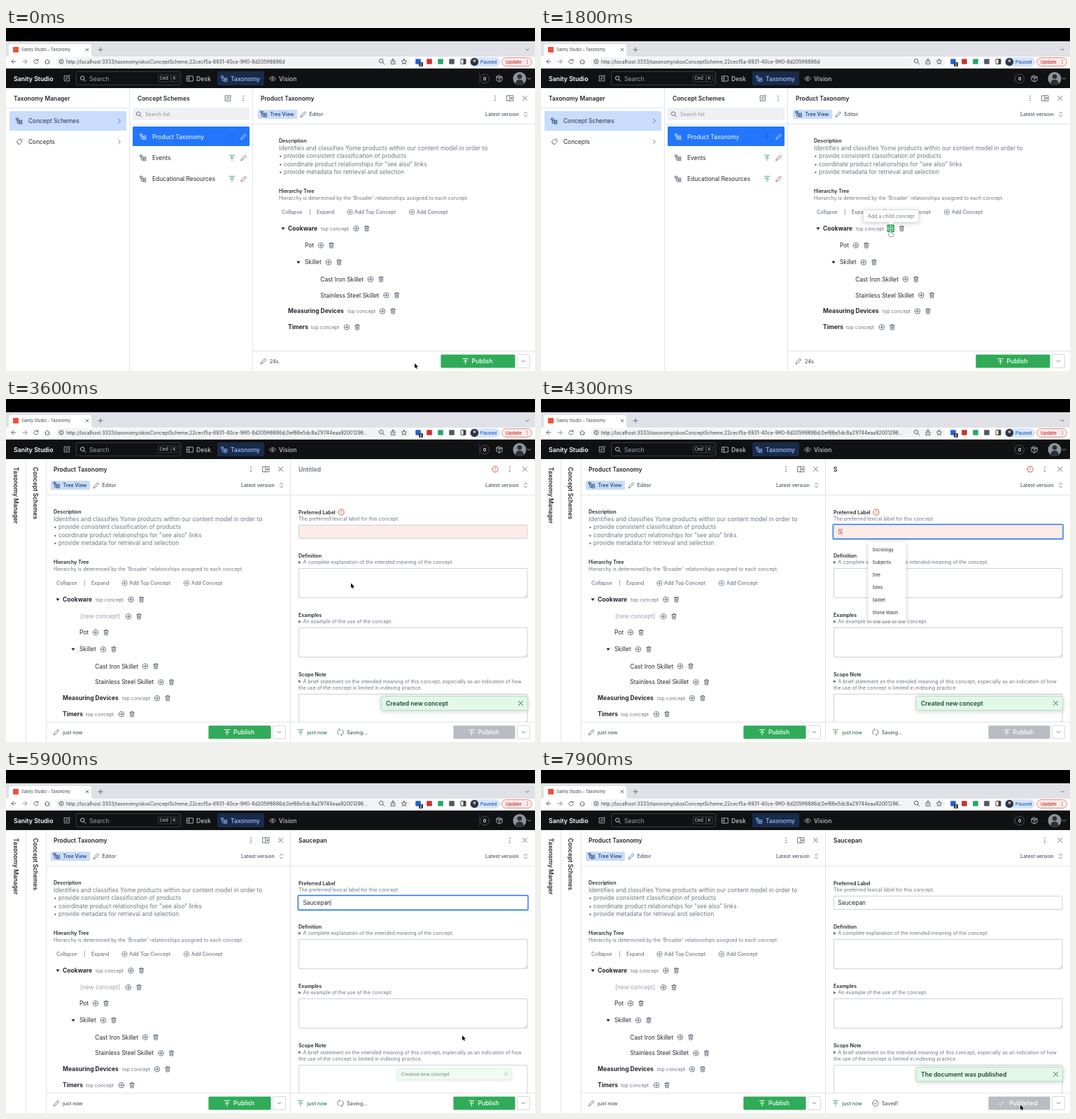
Recreate the animation shown at these times as an HTML page. Size 756 by 491 pixels, loop 8000 ms.

```html
<!DOCTYPE html>
<html lang="en">
<head>
<meta charset="utf-8">
<title>Taxonomy studio</title>
<style>
html, body { margin: 0; width: 756px; height: 491px; overflow: hidden; background: #fff; }
svg { display: block; font-family: Inter, "Liberation Sans", sans-serif; }
text { white-space: pre; }
</style>
</head>
<body>
<svg id="stage" width="756" height="491" viewBox="0 0 756 491"></svg>
<script>
const LOOP = 8000, STEP = 100;
const INK = '#22262d', GREY = '#6e7683', DARK = '#4b5563', LINE = '#e1e4e9';
const GREEN = '#30ab59', BLUE = '#2276fc', PALE = '#c8dcfc', RED = '#bf382d';
const MONO = 'font-family="Noto Sans Mono, monospace"';

// Icon outlines, each centred on 0,0
const ICONS = {
  plus: 'M-3.7 0a3.7 3.7 0 1 0 7.4 0a3.7 3.7 0 1 0-7.4 0M-2 0h4M0-2v4',
  trash: 'M-3.2-2.6h6.4M-1.2-2.6v-1.1h2.4v1.1M-2.5-2.6l.4 6.2h4.2l.4-6.2M-.8-.9v2.8M.8-.9v2.8',
  upload: 'M-3.7-3.6h7.4M0 4v-5.6M-2.7.8L0-1.9 2.7.8',
  pencil: 'M-3.7 3.7l.7-2.4 5-5 1.7 1.7-5 5z',
  tree: 'M-4.3-3.8h3v2h-3zM-2.8-1.8v4.9h3M-2.8 0h3M.3-1h3.6v2H.3zM.3 2.1h3.6v2H.3z',
  close: 'M-3-3l6 6M3-3l-6 6',
  tabClose: 'M-2-2l4 4M2-2l-4 4',
  dots: 'M0-3.1v.1M0 0v.1M0 3.1v.1',
  smallDots: 'M0-2.3v.1M0 0v.1M0 2.3v.1',
  split: 'M-4.5-3.7h9v7.4h-9zM-.7-3.7v7.4M.7 0h2.6M2-1.3v2.6',
  right: 'M-1.4-2.8l2.8 2.8-2.8 2.8',
  down: 'M-2.2-1.1L0 1.1l2.2-2.2',
  sort: 'M-2-1.3l2-2 2 2M-2 1.3l2 2 2-2',
  grip: 'M-1.5 1.5l3-3M0 1.5l1.5-1.5',
  compose: 'M1-3.6h-4.8v7.4h7.4V-.8M-1.2 1.2l.3-1.7 4.2-4.2 1.4 1.4-4.2 4.2z',
  search: 'M-3.6-.8a2.8 2.8 0 1 0 5.6 0a2.8 2.8 0 1 0-5.6 0M1.2 1.2l2.6 2.6',
  tag: 'M-3.4-.6l3.6-3.2 3.4.3.2 3.4L.2 3.6zM-3.4.8l3.2 3.2M1.7-1.7v.1',
  desk: 'M-4.3-3.6h8.6v7.2h-8.6zM-1.4-3.6v7.2M-4.3 0h2.9',
  eye: 'M-4.6 0q4.6-6.2 9.2 0q-4.6 6.2-9.2 0M-1.3 0a1.3 1.3 0 1 0 2.6 0a1.3 1.3 0 1 0-2.6 0',
  cube: 'M0-4.5l4 2v5l-4 2-4-2v-5zM-4-2.5l4 2 4-2M0-.5v5M-2-3.5l4 2',
  back: 'M3 0h-6M0-3l-3 3 3 3',
  forward: 'M-3 0h6M0-3l3 3-3 3',
  reload: 'M2.4-1.7a3 3 0 1 0 .5 2.4M2.9-3.4v2h-2',
  home: 'M-3.5.2L0-3l3.5 3.2M-2.4-.4v3.5h4.8v-3.5',
  info: 'M-3 0a3 3 0 1 0 6 0a3 3 0 1 0-6 0M0-.3v1.8M0-1.6v.1',
  share: 'M-1.5-1h-1.3v4.6h5.6V-1H1.5M0 1.2v-5M-1.5-2.4L0-3.9l1.5 1.5',
  star: 'M0-3.6l1.1 2.4 2.6.3-1.9 1.8.5 2.6L0 2.2l-2.3 1.3.5-2.6-1.9-1.8 2.6-.3z',
  add: 'M-3 0h6M0-3v6',
  alert: 'M-4.1 0a4.1 4.1 0 1 0 8.2 0a4.1 4.1 0 1 0-8.2 0M0-2v2.2M0 1.8v.1',
  sync: 'M-2.2 3.6a4.2 4.2 0 0 1 .4-7.4M-1-5l-.6 1.4 1.4.7M2.2-3.6a4.2 4.2 0 0 1-.4 7.4M1 5l.6-1.4-1.4-.7',
  saved: 'M-4.2 0a4.2 4.2 0 1 0 8.4 0a4.2 4.2 0 1 0-8.4 0M-1.8.1l1.3 1.4L2-1.4',
  check: 'M-3.4.4l2.2 2.3L3.6-2.7'
};

const text = (x, y, s, size = 8.4, fill = INK, weight = 400, extra = '') =>
  `<text x="${x}" y="${y + size * .36}" font-size="${size}" fill="${fill}" font-weight="${weight}" ${extra}>${s}</text>`;
const small = (x, y, s, fill = GREY, weight = 400) => text(x, y, s, 7.1, fill, weight);
const title = (x, s, fill = INK) => text(x, 100.5, s, 8.45, fill, 600);
const rect = (x, y, w, h, fill, r = 0, stroke = 'none', sw = 1) =>
  `<rect x="${x}" y="${y}" width="${w}" height="${h}" fill="${fill}" rx="${r}" stroke="${stroke}" stroke-width="${sw}"/>`;
const icon = (name, x, y, color = DARK, sw = .8) =>
  `<path d="${ICONS[name]}" transform="translate(${x} ${y})" fill="none" stroke="${color}" ` +
  `stroke-width="${sw}" stroke-linecap="round" stroke-linejoin="round"/>`;
const kebab = x => icon('dots', x, 100.5, DARK, 1.5);
const shape = (d, x, y, fill = INK) => `<path d="${d}" transform="translate(${x} ${y})" fill="${fill}"/>`;
const disc = (x, y, r, fill) => `<circle cx="${x}" cy="${y}" r="${r}" fill="${fill}"/>`;
const hline = (x, y, w) => rect(x, y, w, 1, LINE);
const vline = x => rect(x, 86, 1, 405, LINE);
const shadow = s => `<g style="filter:drop-shadow(0 1.5px 3px #0003)">${s}</g>`;
const clamp = v => Math.max(0, Math.min(1, v));
const ease = v => (v = clamp(v), v * v * (3 - 2 * v));

function browser(longUrl) {
  const path = 'http://localhost:3333/taxonomy/skosConceptScheme;22cecf5a-6931-40ce-9ff0-8d205ff6686d' +
    (longUrl ? ';0ef66e5dc8a21f744eaa92001296...' : '');
  let s = rect(0, 0, 756, 19, '#000') + rect(0, 19, 756, 22, '#dfe1e6') +
    shape('M0 18q3 0 3-3v-12q0-3 3-3h112q3 0 3 3v12q0 3 3 3z', 1, 23, '#fff') +
    rect(0, 41, 756, 17, '#fff') + rect(71, 42, 507, 13, '#f2f3f5', 6.5) +
    rect(10, 27, 8, 8, '#f0503c', 1) + text(22, 31, 'Sanity Studio – Taxonomy', 5.75, '#3c4043') +
    icon('tabClose', 116, 31) + icon('add', 135, 31) + icon('down', 745, 31);
  [['back', 11], ['forward', 27], ['reload', 43], ['home', 59], ['info', 79], ['search', 537], ['share', 553], ['star', 569]]
    .forEach(([name, x]) => s += icon(name, x, 48, name === 'forward' ? '#73777d' : '#3c4043'));
  s += text(86, 48.5, path, 6.9, '#3c4043');
  [[589, '#2463d8'], [605, '#cf3030'], [621, '#24a866'], [637, '#55595f']]
    .forEach(([x, c]) => s += rect(x - 3.8, 44.2, 7.6, 7.6, c, 1));
  return s + rect(590, 49, 6, 6, '#333', 1) + text(591.3, 52, '2', 5, '#fff', 600) +
    rect(650, 44.5, 7, 7, 'none', .5, '#444') + rect(653.5, 44.5, 3.5, 7, '#444') +
    rect(662, 42, 44, 13, '#d6e5fc', 6.5) + disc(669.5, 48.5, 5.7, '#2b3646') + disc(669.5, 47, 2, '#d99f92') +
    text(678, 48.5, 'Paused', 6.6, '#1a56b0', 500) +
    rect(708.5, 42.5, 43, 12, '#fdecea', 6, '#d9776d', .8) + text(714, 48.5, 'Update', 6.6, '#c5221f', 500) +
    icon('smallDots', 745, 48.5, '#c5221f', 1.2);
}

function navbar() {
  const light = '#c6cad1';
  return rect(0, 58, 756, 28, '#101113') + text(11, 72.5, 'Sanity Studio', 8.8, '#fff', 600) +
    icon('compose', 87, 72, light) + rect(100.5, 62.5, 148, 19, '#101113', 1.5, '#363a41') +
    icon('search', 110, 72.5, light, 1) + text(119, 72.5, 'Search', 8.6, '#9ea4ae') +
    rect(217.5, 67, 18, 10, 'none', 1, '#464b54', .7) + text(219.5, 72, 'Cmd', 6.8, light, 400, MONO) +
    rect(236.5, 67, 8.5, 10, 'none', 1, '#464b54', .7) + text(238.7, 72, 'K', 6.8, light, 400, MONO) +
    rect(250, 63, 1, 18, '#25282d') + icon('desk', 263, 72.5, light) + text(272, 72.5, 'Desk', 8.6, light, 500) +
    rect(302, 62, 67, 20, '#192a4a', 1.5) + icon('tree', 312, 72.5, '#8db5fb') + text(321, 72.5, 'Taxonomy', 8.5, '#a0c3ff', 500) +
    icon('eye', 381, 72.5, light) + text(390, 72.5, 'Vision', 8.6, light, 500) +
    rect(676, 63, 1, 18, '#25282d') + `<circle cx="684" cy="72.5" r="6.5" fill="none" stroke="#4a4f58"/>` +
    text(681.9, 72.5, '0', 6.4, '#fff', 600) + icon('cube', 705, 72.5, light) +
    disc(734, 72.5, 9.5, '#8c959b') + shape('M-6 7.2q.6-6 6-6t6 6q-6 4.6-12 0z', 734, 72.5, '#2c2f34') +
    disc(734, 69.5, 3.3, '#2c2f34') + icon('down', 747.5, 72.5, light);
}

function lists() {
  let s = vline(176) + vline(352) + title(11, 'Taxonomy Manager') + hline(0, 114, 176) +
    rect(5, 119, 167, 28, PALE, 1.5) + icon('tree', 19, 133, '#223a66') + text(32, 133, 'Concept Schemes', 8.4, '#1b2f55') +
    icon('right', 162, 133, '#3a5584') + icon('tag', 19, 163) + text(32, 163, 'Concepts') + icon('right', 162, 163) +
    title(188, 'Concept Schemes') + icon('compose', 317, 100.5) + kebab(339) +
    rect(181, 114, 167, 18, '#eef0f3', 1.5) + icon('search', 190, 123.5) + small(199, 123.5, 'Search list', '#8a919c') +
    hline(177, 137, 175) + rect(181, 141, 167, 28, BLUE, 1.5);
  ['Product Taxonomy', 'Events', 'Educational Resources'].forEach((name, i) => {
    const y = 155.5 + i * 30.2;
    s += icon('tree', 196, y, i ? DARK : '#dce9ff') + text(209, y, name, 8.4, i ? INK : '#fff') +
      icon('upload', 323, y, i ? '#2f8f56' : '#1a5fd2') + icon('pencil', 339.5, y, i ? '#8a5550' : '#e3edff');
  });
  return s;
}

function collapsed() {
  const vert = (x, s) => `<g transform="translate(${x} 97.6) rotate(90)">${text(0, 0, s, 8.45, INK, 600)}</g>`;
  return vline(28) + vline(57) + vert(13.8, 'Taxonomy Manager') + vert(42.2, 'Concept Schemes');
}

const paneTools = right => text(right - 71, 123.5, 'Latest version', 7.1, DARK, 500) +
  icon('sort', right - 13.5, 123.5) + icon('close', right - 14.5, 100.5);

function button(x, right, label, fill, name = 'upload') {
  const mid = (x + right - 28) / 2, done = label === 'Published';
  return rect(x + .4, 467.4, right - 28.8 - x, 19.2, fill, 1.5) + icon(name, mid - (done ? 26 : 18), 477, '#fff', 1) +
    text(mid - (done ? 14.5 : 9), 477, label, 8.6, '#fff', 500) +
    rect(right - 25.5, 467.5, 18, 19, '#fff', 1.5, '#d5d9df') + icon('down', right - 16.5, 477);
}

// [indent, label, plus offset, "top concept" offset, caret]
const ROWS = [
  [13, 'Cookware', 110.5, 60, 1], [38, '[new concept]', 107], [37, 'Pot', 60], [37, 'Skillet', 71, 0, 1],
  [59.3, 'Cast Iron Skillet', 131], [59.3, 'Stainless Steel Skillet', 153.5],
  [13, 'Measuring Devices', 148, 98], [13, 'Timers', 97, 46]
];

function tree(ox, withNew) {
  const rows = ROWS.filter((row, i) => withNew || i !== 1);
  let s = '', y = 287;
  rows.forEach(([dx, label, add, top, caret], i) => {
    const root = dx === 13;
    if (caret) s += shape('M-2.6-1.6h5.2L0 2z', ox + dx - (root ? 7 : 9), y);
    s += text(ox + dx, y, label, root ? 8.5 : 8.4, label[0] === '[' ? '#9aa1ac' : INK, root ? 700 : 400) +
      (top ? small(ox + top, y + .3, 'top concept') : '') + icon('plus', ox + add, y) + icon('trash', ox + add + 15, y);
    // rows beside an opened branch stand slightly further apart
    const next = rows[i + 1];
    y += caret || next && next[4] ? 24.2 : 22.9;
  });
  return s;
}

function treePane(left, right, ox, withNew, age, ageColor) {
  let s = title(left + 11, 'Product Taxonomy') + kebab(right - 57) +
    icon('split', right - 35.5, 100.5) + paneTools(right) +
    rect(left + 7, 117, 56, 13, PALE, 1.5) + icon('tree', left + 15.5, 123, '#223a66') +
    small(left + 24.5, 123.5, 'Tree View', '#1c3361', 500) + icon('pencil', left + 72, 123.5) +
    small(left + 80.5, 123.5, 'Editor', DARK, 500) + hline(left, 137, right - left) +
    small(ox, 161.5, 'Description', INK, 600);
  ['Identifies and classifies Yome products within our content model in order to',
    '• provide consistent classification of products',
    '• coordinate product relationships for "see also" links',
    '• provide metadata for retrieval and selection'
  ].forEach((line, i) => s += text(ox, 171.5 + i * 11.6, line, 8.4, GREY));
  s += small(ox, 233.5, 'Hierarchy Tree', INK, 600) +
    small(ox, 243, "Hierarchy is determined by the 'Broader' relationships assigned to each concept.");
  [[4, 'Collapse'], [43, '|'], [54, 'Expand'], [108, 'Add Top Concept'], [197, 'Add Concept']]
    .forEach(([dx, label]) => s += small(ox + dx, 263.5, label, GREY, 500));
  return s + icon('plus', ox + 101.5, 263.5, GREY) + icon('plus', ox + 190, 263.5, GREY) + tree(ox, withNew) +
    rect(left + 1, 462, right - left - 1, 29, '#fff') + hline(left, 462, right - left) +
    icon('pencil', left + 15, 477, ageColor) + small(left + 24, 477.5, age, ageColor, 500) +
    button(right - (withNew ? 118 : 135), right, 'Publish', GREEN);
}

function formPane(t) {
  const typed = 'Saucepan'.slice(0, t < 4300 ? 0 : 1 + Math.floor((t - 4300) / 110));
  const invalid = t < 4800, focused = t >= 4100 && t < 6900, published = t >= 7400;
  let s = vline(406) + title(418, typed || 'Untitled', typed ? INK : GREY) +
    kebab(720) + paneTools(756) + hline(407, 137, 349) +
    small(418, 162, 'Preferred Label', INK, 600) + small(418, 171.5, 'The preferred lexical label for this concept.') +
    (invalid ? icon('alert', 699, 100.5, RED) + icon('alert', 479, 162, RED) : '') +
    rect(418.5, 180.5, 326.5, 19, invalid ? '#fdebe7' : '#fff', .5, '#ccd1d9') +
    (focused ? rect(417.2, 179.3, 329, 21.2, 'none', 1.2, BLUE, 1.3) : '') +
    text(424.5, 190, typed + (focused ? '<tspan font-weight="300" dx="-1.2">|</tspan>' : ''), 8.4, invalid ? '#b8382e' : INK);
  [['Definition', 224, 'A complete explanation of the intended meaning of the concept.'],
    ['Examples', 309, 'An example of the use of the concept.'],
    ['Scope Note', 394.5, 'A brief statement on the intended meaning of this concept, especially as an indication of how']
  ].forEach(([label, y, hint], i) => {
    const top = y + (i === 2 ? 28 : 18.5);
    s += small(418, y, label, INK, 600) + shape('M0-2.2l4 2.2-4 2.2z', 418, y + 9.7, GREY) + small(424.5, y + 9.7, hint) +
      rect(418.5, top, 326.5, 42, '#fff', .5, '#ccd1d9') + icon('grip', 743, top + 39.5, '#999', .5);
  });
  s += small(418, 413.5, 'the use of the concept is limited in indexing practice.') +
    rect(407, 462, 349, 29, '#fff') + hline(407, 462, 349) +
    icon('upload', 421, 477, '#2f8f56') + small(430.5, 477.5, 'just now', '#2b7a4b', 500) +
    icon(t < 6300 ? 'sync' : 'saved', 478, 477) + small(487, 477.5, t < 6300 ? 'Saving...' : 'Saved!', DARK, 500);
  const fill = invalid || published ? '#b9bcc2' : t < 6700 ? GREEN : t < 7000 ? '#298f4c' : '#20352f';
  s += published ? button(639, 756, 'Published', fill, 'check') : button(639, 756, 'Publish', fill);
  if (typed.length === 1) {
    s += shadow(rect(467.5, 204.5, 54, 113, '#fff', 1)) +
      ['Sociology', 'Subjects', 'Site', 'Sites', 'Skillet', 'Stone Wash']
        .map((word, i) => text(473.5, 215.5 + i * 18, word, 6.5)).join('');
  }
  if (t >= 6700 && !published) {
    s += shadow(rect(652.5, 447.5, 62, 17.5, '#fff', 1.5, '#d8dbe1', .8));
    [[656, 22, 'Ctrl'], [681, 17.5, 'Alt'], [701, 9.5, 'P']].forEach(([x, w, key]) =>
      s += rect(x, 451.5, w, 10, '#fff', 1, '#ccd1d9', .7) + text(x + 2.3, 456.5, key, 6.8, GREY, 400, MONO));
  }
  return s + toast(t, 3400, 5800, 'Created new concept') + toast(t, 7500, 9999, 'The document was published');
}

function toast(t, start, end, label) {
  if (t < start || t >= end + 200) return '';
  const enter = ease((t - start + 100) / 300), leave = clamp((t - end) / 200);
  const scale = (.25 + .75 * enter) * (1 - .44 * leave);
  return `<g opacity="${enter * (1 - leave)}" transform="translate(641 ${435.5 + 32 * (1 - enter)}) scale(${scale}) translate(-641 -435.5)">` +
    shadow(rect(536.5, 425.5, 209, 20, '#e2f8e9', 1.5, '#b3e2c3')) +
    text(543, 435.5, label, 8.6, '#1d4a30', 600) + icon('close', 735.5, 435.5, '#1d5a36', .9) + '</g>';
}

function hoverAdd() {
  return rect(494.5, 281.5, 10.5, 10.8, GREEN, 1) + icon('plus', 499.7, 287, '#fff') +
    shadow(rect(460.5, 260.5, 79, 17.5, '#fff', 1.5, '#d8dbe1', .8) + shape('M-4 0h8L0 3.6z', 500, 278, '#fff')) +
    small(467, 269.5, 'Add a child concept');
}

// [time, x, y]
const TRACK = [[600, 584, 480], [1500, 499, 290.5], [2400, 499, 290.5], [2700, 501, 289.5], [3400, 501, 289.5],
  [4000, 470, 190], [5300, 470, 190], [5700, 652, 380], [6000, 652, 380], [6700, 685, 479.5], [8000, 685, 479.5]];

function pointer(t) {
  if (t >= 4200 && t < 5400) return '';
  const i = Math.max(1, TRACK.findIndex(k => k[0] > t));
  const [t0, x0, y0] = TRACK[i - 1], [t1, x1, y1] = TRACK[i], k = ease((t - t0) / (t1 - t0));
  const x = x0 + (x1 - x0) * k, y = y0 + (y1 - y0) * k;
  const hand = t >= 1400 && t < 2600 || t >= 6700 && t < 7400;
  const press = t >= 7000 && t < 7300 ? `<circle cx="${x}" cy="${y + 2}" r="7.5" fill="none" stroke="#22262a" stroke-width="1.2"/>` : '';
  const d = hand ? 'M-.8.6q.8-1.2 1.6 0v2.2l3 .7q.7.3.6 1l-.5 3.6h-4.4l-2.2-3q.6-1 1.9.2z'
    : 'M0 0v6.8l1.6-1.4 1 2.4 1.2-.5-1-2.3h2.2z';
  return press + `<path d="${d}" transform="translate(${x} ${y})" fill="${hand ? '#fff' : '#000'}" stroke="${hand ? '#000' : '#fff'}" stroke-width=".7" paint-order="stroke"/>`;
}

function scene(t) {
  const page = t < 3300
    ? lists() + treePane(353, 756, 390, false, t < 3000 ? '24s' : 'just now', t < 3000 ? DARK : '#853c3c') +
      (t >= 1400 ? hoverAdd() : '')
    : collapsed() + treePane(57, 407, 68, true, 'just now', DARK) + formPane(t);
  return rect(0, 0, 756, 491, '#fff') + browser(t >= 3000) + navbar() + page + pointer(t);
}

const stage = document.getElementById('stage'), begin = performance.now();
let shown = -1;
function draw() {
  const t = Math.floor((performance.now() - begin) % LOOP / STEP) * STEP;
  if (t !== shown) stage.innerHTML = scene(shown = t);
  requestAnimationFrame(draw);
}
draw();
</script>
</body>
</html>
```
